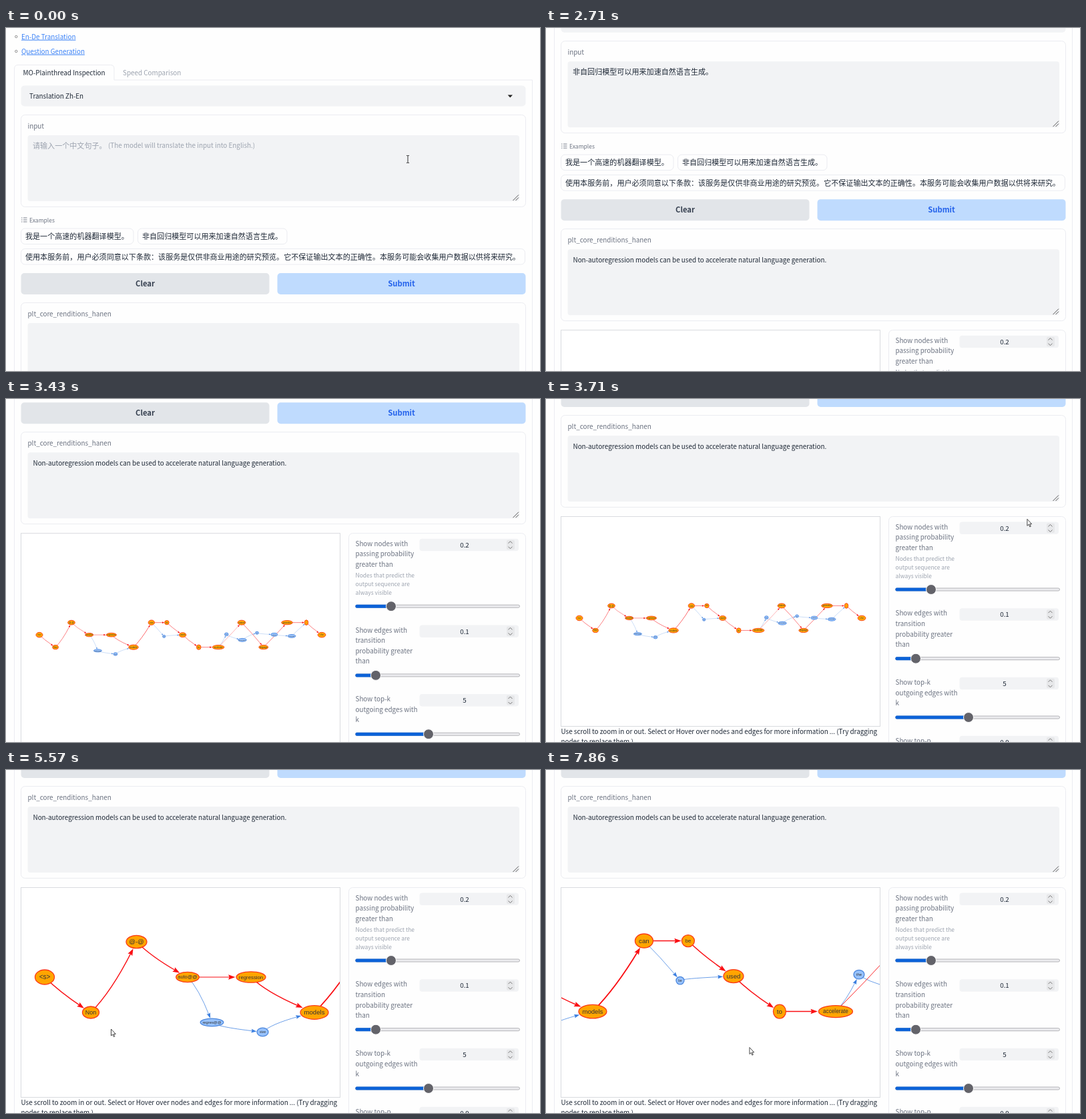
An HTML page that plays this animation: 800x515 px, repeating every 8000 ms.

```html
<!DOCTYPE html>
<html lang="en">
<head>
<meta charset="utf-8">
<title>Translation demo</title>
<style>
  html, body { margin: 0; width: 100%; height: 100%; overflow: hidden; background: #fefefe; }
  #stage { display: block; width: 100vw; height: 100vh; }
  text { font-family: "Noto Sans CJK SC", "Noto Sans CJK JP", "Noto Sans CJK", "Open Sans", sans-serif; white-space: pre; }
  #graph text { font-family: "Liberation Sans", Arial, sans-serif; fill: #343434; text-anchor: middle; }
</style>
</head>
<body>
<svg id="stage" viewBox="0 0 800 515">
  <g id="page"></g>
  <path id="arrow" d="M0 0V10L2.3 7.9L3.9 11.6L5.4 10.9L3.8 7.4H6.8Z" fill="#fff" stroke="#333" stroke-width=".9"/>
  <path id="beam" d="M-2 -5.5H-.6L0 -5L.6 -5.5H2M0 -5V5M-2 5.5H-.6L0 5L.6 5.5H2" fill="none" stroke="#333"/>
</svg>
<script>
const LOOP = 8000, FRAME_RATE = 7;
const LATIN = 9.87, SMALL = 8.5, HAN = 11.07;
const INK = '#1f2937', GREY = '#6b7280', PALE = '#9ca3af', LINE = '#ebecf1', FIELD = '#f2f3f5';
const $ = id => document.getElementById(id);

// ---- Page pieces, in unscrolled coordinates ----
const text = (x, y, str, size = LATIN, fill = INK, extra = '') =>
  `<text x="${x}" y="${y + size * .37}" font-size="${size}" fill="${fill}" ${extra}>${str}</text>`;
const box = (x1, y1, x2, y2, r, fill, stroke = 'none') =>
  `<rect x="${x1}" y="${y1}" width="${x2 - x1}" height="${y2 - y1}" rx="${r}" fill="${fill}" stroke="${stroke}"/>`;
const lines = (x, y, step, list, size, fill) =>
  list.map((str, i) => text(x, y + i * step, str, size, fill)).join('');
const stroke = (d, color, width = 1) =>
  `<path d="${d}" fill="none" stroke="${color}" stroke-width="${width}"/>`;

const link = (y, str) =>
  `<circle cx="15.3" cy="${y}" r="1.7" fill="none" stroke="#777" stroke-width=".8"/>` +
  text(23, y, str, LATIN, '#3b82f6', 'text-decoration="underline"');

const chip = (x1, y1, x2, str) =>
  box(x1, y1, x2, y1 + 23.5, 6, '#fefefe', LINE) + text(x1 + 6.5, y1 + 12, str, HAN);

const textBlock = (top, label) =>
  box(22.5, top, 778.5, top + 138, 6, 'none', LINE) +
  text(32.5, top + 16.5, label, LATIN, GREY) +
  box(32.5, top + 30.5, 769, top + 129.5, 4, FIELD) +
  stroke(`M759.5 ${top + 128.5}l8.5 -8.5M763.5 ${top + 128.5}l4.5 -4.5`, '#555');

const button = (x, str, fill, ink) =>
  box(x, 368, x + 372, 400, 5, fill) +
  text(x + 186, 384, str, 11.3, ink, 'font-weight="700" text-anchor="middle"');

const slider = (y, value, knobX, trackY, labels, info = []) =>
  lines(523.5, y, 15.6, labels, LATIN, GREY) +
  lines(523.5, y + 47.5, 13, info, SMALL, PALE) +
  box(619.5, y - 7.5, 768, y + 11, 4, FIELD) +
  text(687, y + 2, value, LATIN, INK, 'text-anchor="middle"') +
  box(750, y - 5.5, 762, y + 9, 2, '#e7e8ea') +
  stroke(`M752.5 ${y - .5}l3 -3l3 3M752.5 ${y + 4.5}l3 3l3 -3`, '#777') +
  box(523.5, trackY - 2, 769.5, trackY + 2, 2, '#ececef', '#b4b4b8') +
  box(523.5, trackY - 2.5, knobX, trackY + 2.5, 2, '#0b62d8') +
  `<circle cx="${knobX}" cy="${trackY}" r="7.5" fill="#63636a" stroke="#fff"/>`;

// ---- Translation graph: name, x, y, rx, ry, font size ----
const mainNodes = [
  ['&lt;s&gt;', 58, 311, 14.5, 11, 10], ['Non', 127, 364, 12.5, 9, 9],
  ['@-@', 195.5, 258, 15.5, 9.7, 9.5], ['auto@@', 272, 311, 17.3, 7.7, 7.4],
  ['regression', 367, 311, 22, 8.2, 7.8], ['models', 462, 364, 21, 10.3, 9.6],
  ['can', 539, 258, 13.5, 10.6, 9.8], ['be', 605, 258, 9.5, 9, 7.6],
  ['used', 673, 311, 15, 10, 9.6], ['to', 742, 364, 9.5, 10.5, 9.8],
  ['accelerate', 826, 364, 25.5, 9, 8.2], ['natural', 926, 258, 17, 10, 9],
  ['language', 1020, 364, 20, 9, 8], ['generation', 1121, 258, 24, 9, 8],
  ['.', 1204, 258, 8, 11, 10], ['&lt;/s&gt;', 1270, 311, 17, 11, 10]
];
const sideNodes = [
  ['regres@@', 308.5, 379, 17.3, 5.8, 5.8], ['sive', 384.5, 393.5, 8.5, 6.3, 5.2],
  ['be', 593, 317.5, 6, 5.8, 4.8], ['the', 861, 308.5, 8, 6.8, 6],
  ['generation', 929, 333, 18, 7, 6], ['of', 992, 302.5, 7, 6, 6],
  ['natural', 1066, 310, 14, 7, 6], ['language', 1141, 316, 17, 7, 6]
];
const M = mainNodes, S = sideNodes;
const sideChains = [
  [M[3], S[0], S[1], M[5]], [M[6], S[2], M[8]],
  [M[10], S[3], S[4], S[5], S[6], S[7], M[14]]
];

// Quadratic curve that leaves diagonally and stops at the rim of the next node.
function edge([, x1, y1], [, x2, y2, rx, ry], color, width, head) {
  const dx = x2 - x1, dy = y2 - y1, bend = Math.min(Math.abs(dx), Math.abs(dy)) / 2;
  const vx = x1 + Math.sign(dx) * bend, vy = y1 + Math.sign(dy) * bend;
  const at = u => [
    (1 - u) ** 2 * x1 + 2 * u * (1 - u) * vx + u * u * x2,
    (1 - u) ** 2 * y1 + 2 * u * (1 - u) * vy + u * u * y2
  ];
  let u = 1, tip = at(u);
  while (u > 0 && Math.hypot((tip[0] - x2) / rx, (tip[1] - y2) / ry) < 1.04) tip = at(u -= .004);
  const back = at(u - .06);
  const angle = Math.atan2(tip[1] - back[1], tip[0] - back[0]) * 180 / Math.PI;
  // Split the curve so that the stroke ends inside the arrowhead.
  const cut = u - .03, end = at(cut);
  const cx = x1 + (vx - x1) * cut, cy = y1 + (vy - y1) * cut;
  return stroke(`M${x1} ${y1}Q${cx} ${cy} ${end}`, color, width) +
    `<path d="M0 0L${-head} ${-head * .36}L${-head * .85} 0L${-head} ${head * .36}Z" fill="${color}"
      transform="translate(${tip}) rotate(${angle})"/>`;
}

const node = (fill, rim) => ([name, x, y, rx, ry, size]) =>
  `<ellipse cx="${x}" cy="${y}" rx="${rx}" ry="${ry}" fill="${fill}" stroke="${rim}"/>` +
  `<text x="${x}" y="${y + size * .33}" font-size="${size}">${name}</text>`;

const edgeWidth = i => i === 5 ? 1.8 : i === 10 ? .9 : i === 3 || i === 2 ? 1.2 : 1.5;
const graph =
  sideChains.map(chain => chain.slice(1).map((to, i) =>
    edge(chain[i], to, '#3b7fe0', .75, 8)).join('')).join('') +
  M.slice(1).map((to, i) => edge(M[i], to, '#fa0f14', edgeWidth(i), 10.5)).join('') +
  `<g id="nodes">${S.map(node('#97c2fc', '#4a86dd')).join('')}${M.map(node('#ffa500', '#fb3a16')).join('')}</g>`;

$('page').innerHTML =
  link(13, 'En-De Translation') + link(35, 'Question Generation') +
  stroke('M12.5 1400V61Q12.5 55.5 18 55.5H156.5Q162 55.5 162 61V78H788.5V1400', LINE) +
  text(25.5, 67.5, 'MO-Plainthread Inspection') +
  text(175, 67.5, 'Speed Comparison', LATIN, PALE) +
  box(22.5, 86.5, 778.5, 117.5, 5, FIELD) +
  text(35, 102.5, 'Translation Zh-En') +
  '<path d="M751.7 100.5H759L755.3 104.4Z" fill="#222"/>' +
  textBlock(130.5, 'input') +
  `<g id="hint">${text(40, 176.5, '请输入一个中文句子。', HAN, PALE)}${
    text(153, 176.5, '(The model will translate the input into English.)', LATIN, PALE)}</g>` +
  `<g id="typed">${text(40, 176.5, '非自回归模型可以用来加速自然语言生成。', HAN)}</g>` +
  stroke('M23 285h1.5M26 285h5.5M23 288h1.5M26 288h5.5M23 291h1.5M26 291h5.5', GREY, .9) +
  text(35, 288.5, 'Examples', SMALL, GREY) +
  chip(22.5, 301, 191, '我是一个高速的机器翻译模型。') +
  chip(197.5, 301, 421, '非自回归模型可以用来加速自然语言生成。') +
  chip(22.5, 331.5, 777.5, '使用本服务前，用户必须同意以下条款：该服务是仅供非商业用途的研究预览。它不保证输出文本的正确性。本服务可能会收集用户数据以供将来研究。') +
  button(22.5, 'Clear', '#e2e5e9', '#374151') +
  button(406.5, 'Submit', '#bfdbfe', '#2563eb') +
  textBlock(412.5, 'plt_core_renditions_hanen') +
  `<g id="result">${text(40.5, 459, 'Non-autoregression models can be used to accelerate natural language generation.')}</g>` +
  box(22.5, 564.5, 500.5, 879.5, 0, '#fff', '#d9dbdf') +
  `<svg x="23" y="565" width="477" height="314" viewBox="23 177 477 314"><g id="graph">${graph}</g></svg>` +
  lines(22.5, 887.5, 15, ['Use scroll to zoom in or out. Select or Hover over nodes and edges for more information ... (Try dragging', 'nodes to replace them.)']) +
  box(513.5, 564.5, 778.5, 1100, 6, 'none', LINE) +
  slider(580, '0.2', 577, 674, ['Show nodes with', 'passing probability', 'greater than'],
    ['Nodes that predict the', 'output sequence are', 'always visible']) +
  slider(709.7, '0.1', 554, 777.7, ['Show edges with', 'transition', 'probability greater', 'than']) +
  slider(813.3, '5', 633, 866, ['Show top-k', 'outgoing edges with', 'k']) +
  slider(901.3, '0.9', 744, 954, ['Show top-p', 'outgoing edges']);

// ---- Motion: rows of [time, values...], linear between rows ----
const cursorKeys = [
  [0, 602, 197], [140, 602, 197], [700, 345, 314], [900, 345, 314], [1290, 561.5, 364.5],
  [1450, 585, 381], [1860, 585, 381], [2290, 765, 67], [2430, 808, 60],
  [3640, 808, 160], [4290, 46, 338], [5200, 46, 338], [5570, 157.5, 389],
  [5720, 157.5, 389], [6200, 469, 409.5], [6290, 469, 409.5], [6710, 387.5, 418],
  [7050, 225, 421], [7400, 453, 424], [7860, 304, 416.5]
];
const scrollKeys = [[2400, 0], [3500, 388]];
const zoomKeys = [[4290, 0], [5150, 1]];
const panKeys = [[6290, 0, 0], [6710, -81.5, 8.5], [7050, -244, 11.5], [7400, -244, 11.5], [7860, -393, -1.5]];
const SMALL_SCALE = 1 / 2.865, PIVOT = [45.7, 338.6];

function track(keys, t) {
  const next = keys.findIndex(key => key[0] > t);
  if (next < 0) return keys.at(-1).slice(1);
  if (next === 0) return keys[0].slice(1);
  const a = keys[next - 1], b = keys[next], u = (t - a[0]) / (b[0] - a[0]);
  return a.slice(1).map((v, i) => v + (b[i + 1] - v) * u);
}
const move = (id, x, y, more = '') => $(id).setAttribute('transform', `translate(${x} ${y}) ${more}`);
const show = (id, on) => $(id).setAttribute('visibility', on ? 'visible' : 'hidden');

function draw(now) {
  const t = Math.floor((now % LOOP + 5) * FRAME_RATE / 1000) * 1000 / FRAME_RATE % LOOP;
  const [scroll] = track(scrollKeys, t), [cx, cy] = track(cursorKeys, t);
  const [zoom] = track(zoomKeys, t), [px, py] = track(panKeys, t);
  const scale = SMALL_SCALE ** (1 - zoom);

  move('page', 0, -scroll);
  move('graph', px + PIVOT[0] * (1 - scale), py + PIVOT[1] * (1 - scale), `scale(${scale})`);
  $('nodes').setAttribute('stroke-width', Math.max(1.3, .85 / scale));

  show('hint', t < 850);
  show('typed', t >= 850);
  show('result', t >= 1990);

  const overInput = scroll === 0 && cx > 32 && cx < 769 && cy > 161 && cy < 260;
  show('beam', overInput);
  show('arrow', !overInput);
  move('beam', cx, cy);
  move('arrow', cx, cy);
  requestAnimationFrame(draw);
}
requestAnimationFrame(draw);
</script>
</body>
</html>
```
